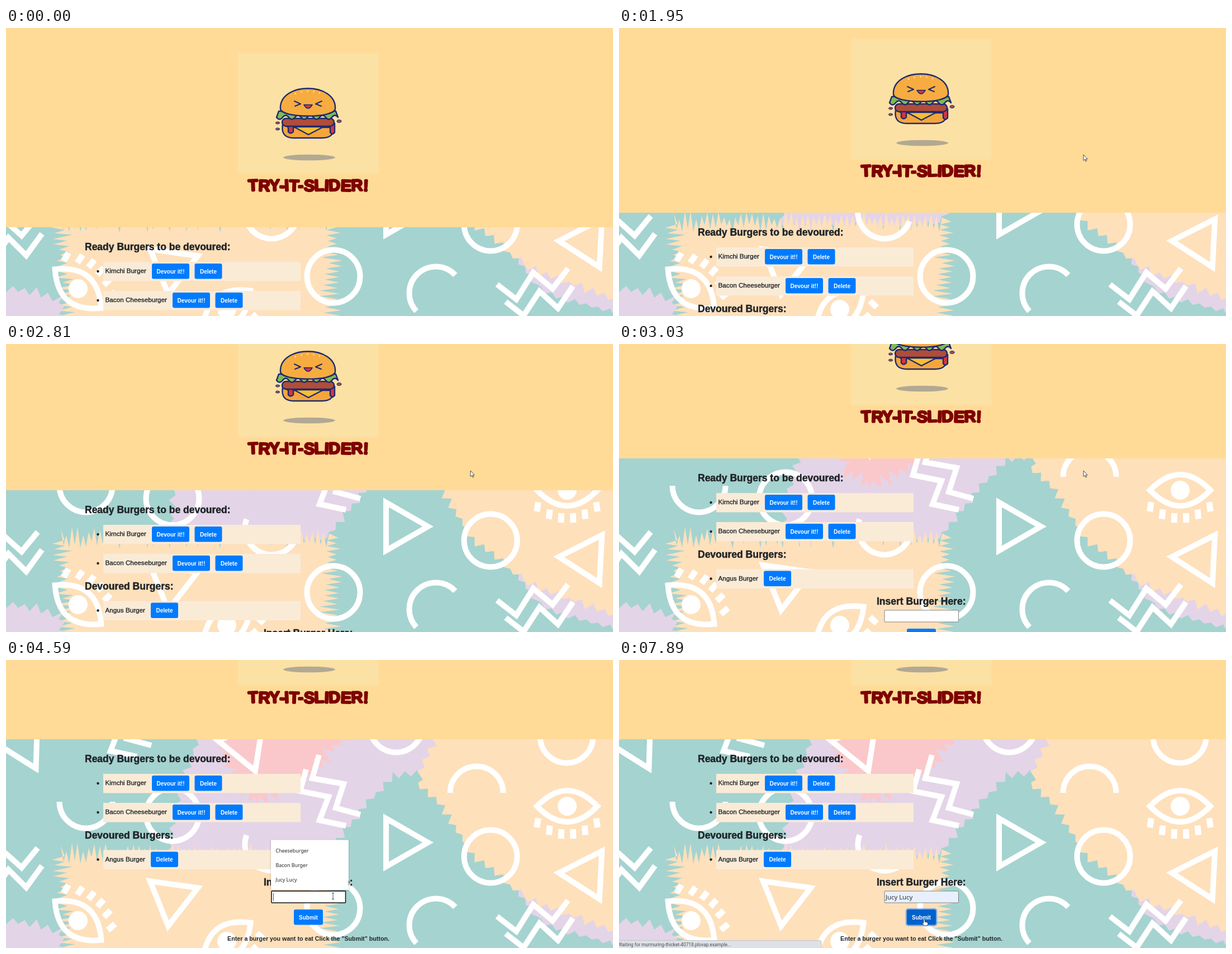
These frames come from a looping animation (1086x516 px, 8000 ms). An HTML page:

```html
<!DOCTYPE html>
<html lang="en">
<head>
<meta charset="utf-8">
<title>Burger list</title>
<style>
  html, body { margin: 0; height: 100%; overflow: hidden; }
  svg { display: block; width: 100vw; height: 100vh; }
  text { font-family: "Liberation Sans", Arial, sans-serif; fill: #212529; }
  .h { font-size: 17.5px; font-weight: bold; stroke: #212529; stroke-width: .5; }
  .item { font-size: 11.7px; stroke: #212529; stroke-width: .35; }
  .btn { font-size: 10px; font-weight: bold; fill: #fff; text-anchor: middle; }
  .hint { font-size: 10.7px; font-weight: bold; text-anchor: middle; }
  .title { font-size: 29px; font-weight: bold; fill: #7e0000; stroke: #7e0000; stroke-width: 2.8; stroke-linejoin: bevel; text-anchor: middle; }
  .opt { font: 500 8.9px "Noto Sans", sans-serif; }
  .status { font: 8.3px Roboto, sans-serif; fill: #4a4d51; }
  .line { fill: none; stroke: #fff; stroke-width: 10; }
  .ink { stroke: #1d2a70; stroke-width: 2.4; stroke-linejoin: round; stroke-linecap: round; }
  #cursor { stroke: #222; stroke-width: .8; }
</style>
</head>
<body>
<svg viewBox="0 0 1086 516" preserveAspectRatio="none">
  <defs>
    <filter id="soft" x="-10%" y="-10%" width="120%" height="125%">
      <feDropShadow dx="0" dy="1" stdDeviation="1.5" flood-opacity=".3"/>
    </filter>
    <circle id="ring" class="line" r="47.5"/>
    <path id="bowl" class="line" d="M47.5 0A47.5 47.5 0 0 1-47.5 0"/>
    <path id="tri" class="line" d="M50 0L-25 43V-43Z"/>
    <path id="zig" class="line" d="M-20-70l-12 42 56 10-14 43 44 12M-43-44l-11 39 51 10-16 42 47 10"/>
    <g id="eye">
      <path class="line" d="M-54 0Q0-56 54 0Q0 56-54 0Z"/>
      <circle r="17" fill="#fff"/>
      <g id="lashes" fill="#fff"></g>
    </g>
  </defs>

  <rect width="1086" height="516" fill="#a5d3d0"/>
  <g id="pattern"></g>

  <g id="page">
    <rect width="1086" height="357" fill="#ffdb97"/>
    <rect x="415" y="45" width="251.5" height="216.5" fill="#fce1a5"/>
    <ellipse cx="542.5" cy="232" rx="46.5" ry="5.3" fill="#b2a993"/>
    <g class="ink">
      <path fill="#f4a63c" d="M495 173H586Q590 197 565 197H515Q491 197 495 173Z"/>
      <path fill="#d5363f" d="M495 171H588V187q-4 6-8 0V178H514V186q-5 5-9 0V178Z"/>
      <path fill="#f7bd35" d="M515 177L541 191 568 177Z"/>
      <rect fill="#b04d38" x="494" y="162" width="93" height="14" rx="7"/>
      <path id="lettuce" fill="#80b957"/>
      <path fill="#f6ac40" d="M491 145C488 96 592 96 589 145C587 162 493 162 491 145Z"/>
      <path fill="none" stroke-width="2" d="M516 131l11 5-10 4M565 131l-11 5 10 4"/>
      <path fill="#d5363f" stroke-width="1.6" d="M533 137.5h15q-7.500 13-15 0Z"/>
      <g fill="#a0554a" stroke-width="1">
        <ellipse cx="486" cy="170" rx="3.5" ry="2"/>
        <ellipse cx="486" cy="181" rx="3.5" ry="2"/>
        <ellipse cx="596" cy="167" rx="4" ry="2.5"/>
      </g>
    </g>
    <path stroke="#fff1cf" stroke-width="2" stroke-dasharray="2 9" fill="none" d="M517 118Q540 109 566 118"/>
    <text class="title" id="title" x="541" y="292">TRY-IT-SLIDER!</text>

    <text class="h" x="141" y="397.5">Ready Burgers to be devoured:</text>
    <text class="h" x="141" y="534.5">Devoured Burgers:</text>
    <text class="h" x="461" y="618.5">Insert Burger Here:</text>
    <g id="items"></g>
    <rect id="field" x="475" y="629" width="132.5" height="21" rx="1"/>
    <path id="caret" stroke="#222" stroke-width=".8" d="M478.500 632.500v14"/>
    <text id="value" x="477" y="644">Jucy Lucy</text>
    <rect id="glow" x="512.7" y="659.7" width="56.6" height="32" rx="5" fill="#007bff"/>
    <g id="submit"></g>
    <text class="hint" x="541" y="718">Enter a burger you want to eat Click the "Submit" button.</text>
  </g>

  <g id="menu">
    <rect x="474" y="322.5" width="139" height="89.5" rx="2" fill="#fff" filter="url(#soft)"/>
    <rect id="hover" x="474" y="380" width="139" height="26" fill="#eeeeef"/>
    <g id="options"></g>
  </g>
  <g id="bar">
    <rect x="-4" y="502.5" width="366" height="20" rx="3" fill="#dee1e6" stroke="#b9bcc1" stroke-width=".8"/>
    <text class="status" x="-2" y="513">Waiting for murmuring-thicket-40718.plovap.example...</text>
  </g>
  <path id="cursor"/>
</svg>

<script>
const $ = id => document.getElementById(id);
const show = (id, on) => $(id).style.display = on ? '' : 'none';
const set = (id, attrs) => Object.entries(attrs).forEach(([k, v]) => $(id).setAttribute(k, v));
const clamp = v => Math.max(0, Math.min(1, v));
const ease = v => (v = clamp(v)) * v * (3 - 2 * v);

// Torn-paper polygon: every edge gets seeded teeth on both sides.
let seed = 4711;
const rnd = () => (seed = seed * 16807 % 2147483647) / 2147483647;
function torn(fill, amp, step, pts) {
  const out = [];
  pts.forEach(([x, y], i) => {
    const [u, v] = pts[(i + 1) % pts.length];
    const dx = u - x, dy = v - y, len = Math.hypot(dx, dy), n = Math.ceil(len / step);
    for (let k = 0; k < n; k++) {
      const a = (k % 2 ? 1 : -1) * amp * (.2 + .8 * rnd()) / len;
      out.push((x + dx * k / n - dy * a).toFixed(1), (y + dy * k / n + dx * a).toFixed(1));
    }
  });
  return `<polygon fill="${fill}" points="${out.join(' ')}"/>`;
}
const put = (id, x, y, turn = 0) =>
  `<use href="#${id}" transform="translate(${x} ${y}) rotate(${turn})"/>`;

const peach = '#fee0bb', lilac = '#e4d4e8', pink = '#fac8ca';
$('pattern').innerHTML =
  torn(lilac, 8, 11, [[360, 90], [300, 270], [290, 355], [565, 355], [692, 205], [790, 205], [800, 90]]) +
  torn(pink, 18, 9, [[375, 95], [400, 225], [460, 258], [545, 210], [640, 95]]) +
  torn(lilac, 7, 11, [[905, 395], [955, 470], [1110, 518], [1110, 395]]) +
  torn(peach, 9, 11, [[787, 90], [735, 222], [780, 264], [835, 350], [925, 425], [1110, 495], [1110, 90]]) +
  torn(peach, 20, 5, [[98, 347], [583, 347], [580, 545], [112, 545]]) +
  torn(lilac, 12, 11, [[-30, 462], [95, 482], [118, 545], [-30, 545]]) +
  put('ring', 698, 118) + put('ring', 1003, 137) + put('ring', 867, 352) +
  put('ring', 586, 445) + put('ring', 298, 277) +
  put('bowl', 143, 254) + put('bowl', 475, 330, 20) + put('bowl', 842, 238, 180) + put('bowl', 769, 475, 137) +
  put('tri', 30, 150, 62) + put('tri', 428, 152, 69) + put('tri', 705, 327) +
  put('tri', 1039, 384, 183) + put('tri', 297, 427, 98) +
  put('zig', 206, 116) + put('zig', 580, 240) + put('zig', 951, 467, -68) + put('zig', 1, 371, -66) +
  put('eye', 1004, 262) + put('eye', 129, 467, 220) + put('eye', 395, 504, -38);

for (let x = -53; x <= 53; x += 21.2)
  $('lashes').innerHTML += `<rect x="-5.5" y="-8" width="11" height="17"
    transform="translate(${x} ${50 - x * x / 135}) rotate(${-x / 6})"/>`;

set('lettuce', { d: 'M488 149L484 160q5.500 7 11 0' + 't11 0'.repeat(9) + 'L590 149Z' });
set('title', { rotate: [...$('title').textContent].map((_, i) => i % 2 ? 2 : -2).join(' ') });

const button = (x, y, w, label) =>
  `<rect x="${x}" y="${y}" width="${w}" height="27.5" rx="3" fill="#007bff"/>
   <text class="btn" x="${x + w / 2}" y="${y + 17.5}">${label}</text>`;
function addItem(y, name, ready) {
  const g = document.createElementNS('http://www.w3.org/2000/svg', 'g');
  $('items').append(g);
  g.innerHTML = `<rect x="174" y="${y}" width="353" height="34.5" fill="#faebd7"/>
    <circle cx="164.5" cy="${y + 17}" r="2.2" fill="#212529"/>
    <text class="item" x="177.5" y="${y + 20}">${name}</text>`;
  const x = Math.round(187.5 + g.querySelector('text').getComputedTextLength());
  g.innerHTML += (ready ? button(x, y + 3, 67, 'Devour it!!') : '') +
    button(ready ? x + 76.5 : x, y + 3, 49, 'Delete');
}
addItem(419, 'Kimchi Burger', true);
addItem(471, 'Bacon Cheeseburger', true);
addItem(555.5, 'Angus Burger', false);
$('submit').innerHTML = button(515, 662, 52, 'Submit');
const submitBox = $('submit').querySelector('rect');
$('options').innerHTML = ['Cheeseburger', 'Bacon Burger', 'Jucy Lucy'].map((name, i) =>
  `<text class="opt" x="482.5" y="${344.5 + 26 * i}">${name}</text>`).join('');

// The page scrolls by equal wheel notches.
const notch = 215 / 3, bottom = 215;
const scrollAt = t => Math.round(2 * notch *
  [1869, 2727, 2994].reduce((sum, start) => sum + ease((t - start) / 210), 0)) / 2;

// Pointer stops: [leave, arrive, x, y]
const stops = [[3540, 4300, 585, 423], [4620, 4900, 742, 474], [4900, 5230, 612, 422],
  [5230, 5460, 564, 392], [6240, 6770, 582, 488], [6770, 7100, 546, 464]];
function pointer(t) {
  const rest = (1 - clamp((t - 172) / 800)) ** 3;
  let x = 831 + 290 * rest, y = 227 + 360 * rest;
  for (const [leave, arrive, u, v] of stops) {
    const k = ease((t - leave) / (arrive - leave));
    x += (u - x) * k;
    y += (v - y) * k;
  }
  return [x, y];
}

const shapes = {
  arrow: 'M0 0V10.500L2.500 8.300 4.200 12 5.600 11.300 4 7.800H7.200Z',
  beam: 'M-2-5.500H2M0-5.500V5.500M-2 5.500H2',
  hand: 'M-1.200 1.200Q0-.6 1.200 1.200V5L6 6.200Q7 6.600 6.800 8L6 12H0L-3.500 7.500Q-3.300 6-1.200 7.500Z'
};

const tick = 77.5;
const sample = t => 250 + Math.floor((t - 235) / tick) * tick;

function draw(now) {
  const t = sample(now % 8000);
  const scroll = scrollAt(t);
  set('page', { transform: `translate(0 ${-scroll})` });

  const [x, y] = pointer(t);
  const within = (l, top, r, b) => scroll === bottom && x >= l && x <= r && y >= top && y <= b;
  const onSubmit = within(515, 447, 567, 474);
  const onText = within(474, 414, 608, 436) || (t > 5740 && within(461, 388, 621, 408));
  const shape = onSubmit ? 'hand' : onText ? 'beam' : 'arrow';
  set('cursor', {
    d: shapes[shape],
    fill: shape === 'beam' ? 'none' : '#fff',
    transform: `translate(${x} ${y})`
  });
  show('cursor', t >= 250);

  const focused = t > 4340 && t < 7330, filled = t > 5360, pressed = t > 7220;
  set('field', {
    fill: filled ? '#e8f0fe' : '#fff',
    stroke: focused ? '#101010' : '#767676',
    'stroke-width': focused ? 1.5 : .9
  });
  show('caret', focused && !filled && (t - 4340) % 1000 < 500);
  show('value', filled);
  $('value').style.font = t < 7330 ? '9.7px "Liberation Sans", Arial, sans-serif' : '11.4px "Open Sans", sans-serif';

  show('menu', t > 4430 && t < 5740);
  show('hover', filled);
  submitBox.setAttribute('fill', pressed ? '#0062cc' : onSubmit ? '#0069d9' : '#007bff');
  set('glow', { opacity: clamp((t - 7220) / 150) * .5 });
  set('bar', { opacity: clamp((t - 7480) / 150) });
  requestAnimationFrame(() => draw(performance.now() - start));
}
const start = performance.now();
draw(0);
</script>
</body>
</html>
```
